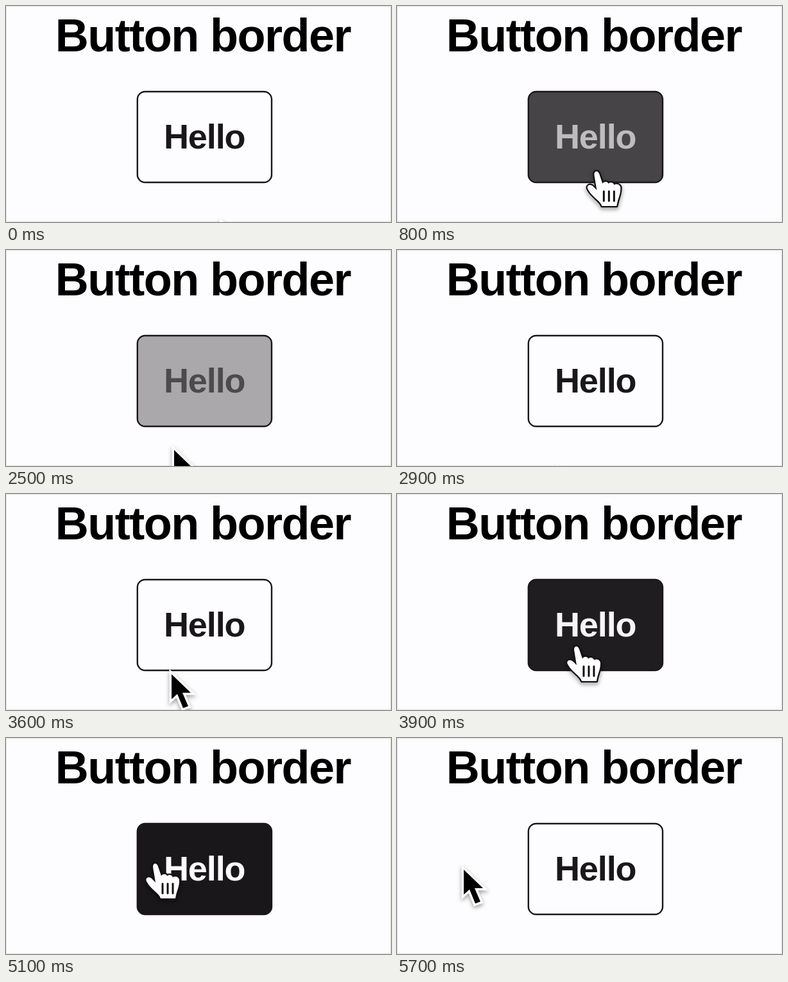
Animation of 600x338 px, one loop 6000 ms. Source, as an HTML page with a canvas:

```html
<!DOCTYPE html>
<html lang="en">
<head>
<meta charset="utf-8">
<title>Button border</title>
<style>
  html, body { margin: 0; width: 100%; height: 100%; overflow: hidden; background: #fdfcfe; }
  canvas { display: block; width: 600px; height: 338px; }
</style>
</head>
<body>
<canvas id="stage" width="600" height="338"></canvas>
<script>
const ctx = document.getElementById('stage').getContext('2d');
const LOOP = 6000, STEP = 100, FADE = 300;
const LIGHT = [253, 252, 254], DARK = [26, 23, 26];
const FONT = '"Liberation Sans", Arial, Helvetica, sans-serif';

// Resting points of the pointer; it eases from one to the next
const STOPS = [
  { t: 100, x: 336, y: 339 },
  { t: 850, x: 311, y: 259 },
  { t: 2250, x: 311, y: 259 },
  { t: 2500, x: 262, y: 313 },
  { t: 3050, x: 250, y: 350 },
  { t: 3600, x: 258, y: 282 },
  { t: 4000, x: 284, y: 232 },
  { t: 4750, x: 233, y: 198 },
  { t: 5100, x: 233, y: 198 },
  { t: 5700, x: 104, y: 206 }
];

// Periods in which the pointer is over the button
const HOVERS = [[650, 2390], [3660, 5270]];

const ARROW = new Path2D('M0 0V39L9 31L18 53L26 50L17 29H30Z');
const HAND = new Path2D(
  'M-4 4C-4 -3 2 -3 4 3L9 18C11 14 17 14 18 18C21 15 26 16 27 20' +
  'C31 17 38 20 37 26C37 36 33 40 31 53H8C6 45 -7 39 -13 28' +
  'C-18 21 -10 17 -5 23L0 28Z');
const FOLDS = new Path2D('M11 30V45M19 30V45M27 30V45');

const clamp = v => Math.min(1, Math.max(0, v));
const lerp = (a, b, k) => a + (b - a) * k;
const smooth = k => k * k * (3 - 2 * k);
const mix = (a, b, k) => `rgb(${a.map((v, i) => Math.round(lerp(v, b[i], k))).join(',')})`;

// CSS "ease": cubic-bezier(.25, .1, .25, 1)
function ease(x) {
  if (x <= 0 || x >= 1) return clamp(x);
  const bez = (s, a, b) => 3 * s * (1 - s) ** 2 * a + 3 * s * s * (1 - s) * b + s ** 3;
  let lo = 0, hi = 1;
  for (let i = 0; i < 24; i++) {
    const mid = (lo + hi) / 2;
    if (bez(mid, 0.25, 0.25) < x) lo = mid; else hi = mid;
  }
  return bez(lo, 0.1, 1);
}

function pointerAt(t) {
  const next = STOPS.findIndex(s => s.t > t);
  const b = STOPS.at(next), a = next > 0 ? STOPS[next - 1] : b;
  const k = a === b ? 0 : smooth((t - a.t) / (b.t - a.t));
  return [lerp(a.x, b.x, k), lerp(a.y, b.y, k)];
}

const isHover = t => HOVERS.some(([on, off]) => t >= on && t < off);
const fillAt = t => HOVERS.reduce(
  (sum, [on, off]) => sum + ease((t - on) / FADE) - ease((t - off) / FADE), 0);

function setShadow(alpha, blur, dy) {
  ctx.shadowColor = `rgba(0,0,0,${alpha})`;
  ctx.shadowBlur = blur;
  ctx.shadowOffsetY = dy;
}

function label(text, x, y, size, color) {
  ctx.font = `bold ${size}px ${FONT}`;
  ctx.letterSpacing = `${-0.021 * size}px`;
  ctx.fillStyle = color;
  ctx.fillText(text, x, y);
}

function drawButton(p) {
  ctx.beginPath();
  ctx.roundRect(204.8, 134, 209.2, 142, 12);
  ctx.fillStyle = mix(LIGHT, DARK, p);
  ctx.fill();
  ctx.strokeStyle = mix(DARK, DARK, 0);
  ctx.lineWidth = 2.4;
  ctx.stroke();
  label('Hello', 246, 223, 54, mix(DARK, LIGHT, p ** 1.5));
}

function outline(path, color, width, join) {
  ctx.lineJoin = join;
  ctx.lineWidth = width;
  ctx.strokeStyle = color;
  ctx.stroke(path);
  setShadow(0, 0, 0);
}

function drawArrow() {
  setShadow(0.38, 6, 3);
  outline(ARROW, '#fff', 7, 'miter');
  ctx.fillStyle = '#000';
  ctx.fill(ARROW);
}

function drawHand() {
  setShadow(0.45, 6, 3);
  outline(HAND, '#111', 4.5, 'round');
  ctx.fillStyle = '#fff';
  ctx.fill(HAND);
  ctx.lineCap = 'round';
  outline(FOLDS, '#111', 3, 'round');
}

function render(t) {
  ctx.fillStyle = mix(LIGHT, DARK, 0);
  ctx.fillRect(0, 0, 600, 338);
  ctx.strokeStyle = '#dfdee0';
  ctx.lineWidth = 1;
  ctx.strokeRect(0.5, 0.5, 599, 337);

  label('Button border', 76.8, 71, 72, '#000');
  drawButton(clamp(fillAt(t)));

  ctx.save();
  ctx.translate(...pointerAt(t));
  if (isHover(t)) drawHand();
  else drawArrow();
  ctx.restore();
}

const start = performance.now();
function tick() {
  const t = (performance.now() - start) % LOOP;
  render(Math.floor(t / STEP) * STEP);
  requestAnimationFrame(tick);
}
tick();
</script>
</body>
</html>
```
